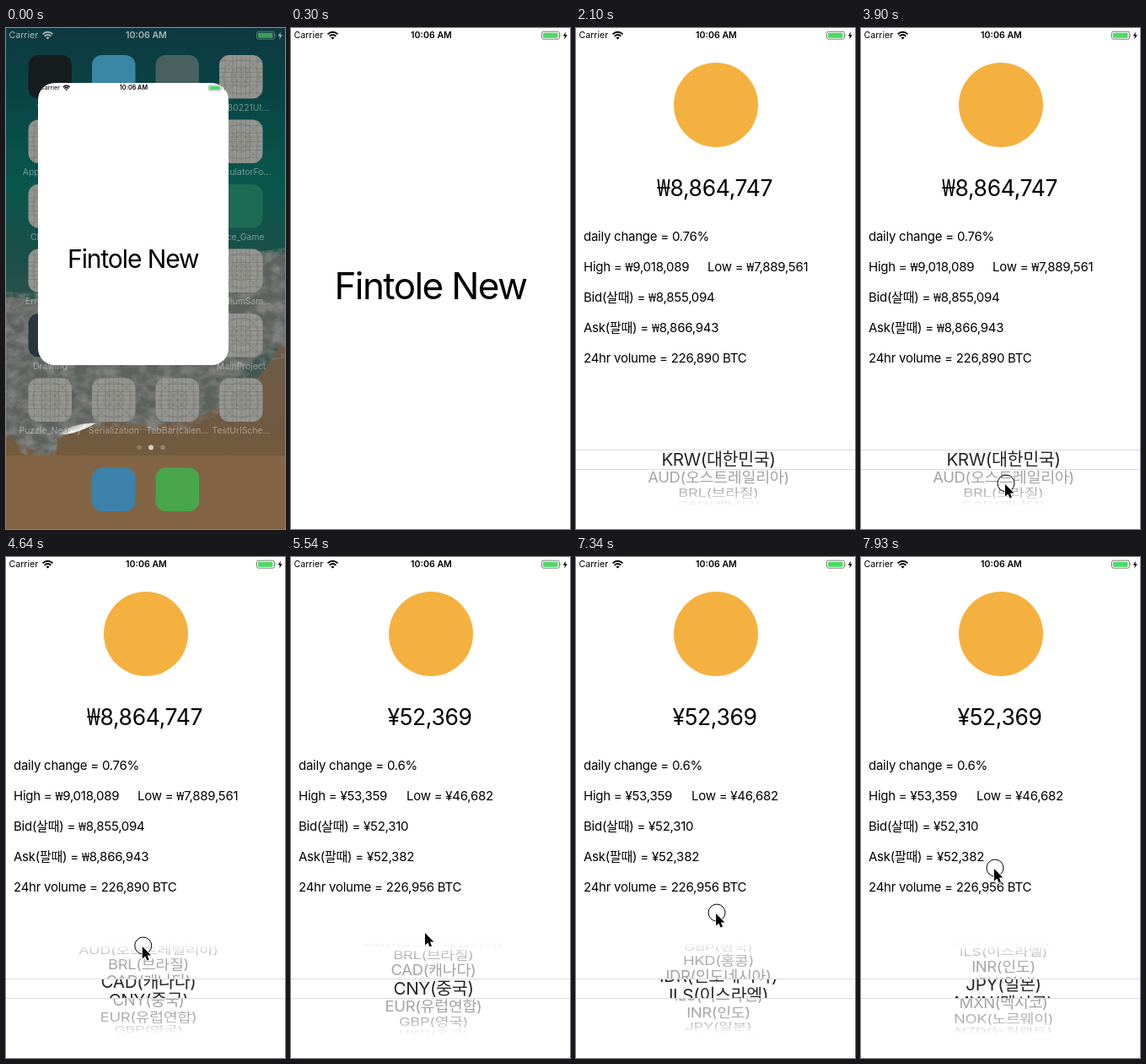
Write an HTML page that moves like this. It is 331 px wide and 593 px high and loops after 8000 ms.

```html
<!DOCTYPE html>
<html lang="ko">
<head>
<meta charset="utf-8">
<title>Price ticker</title>
<style>
  html, body { margin: 0; width: 100%; height: 100%; overflow: hidden; background: #fff; }
  body { position: relative; font-family: Inter, "Noto Sans CJK KR", "Noto Sans CJK", sans-serif; color: #000; }
  div, svg { position: absolute; }
  svg { left: 0; top: 0; overflow: visible; }
  #stage { left: 0; top: 0; width: 331px; height: 593px; overflow: hidden; background: #fff; }
  .full { left: 0; top: 0; width: 331px; height: 593px; }
  .line { white-space: pre; }
  .status { left: 0; top: 0; width: 331px; height: 18px; font-size: 10.6px; line-height: 18px; }
  .status .clock { left: 0; width: 333px; text-align: center; font-weight: 600; }
  .status .carrier { left: 3.5px; }

  #home text { font-size: 10.4px; fill: #fff; fill-opacity: .42; text-anchor: middle; }
  #card { overflow: hidden; background: #fff; }
  #zoom { transform-origin: 0 0; }
  #title { left: 0; width: 331px; top: 275px; line-height: 60px; font-size: 44px; letter-spacing: -1.6px; text-align: center; white-space: pre; }

  #coin { left: 116px; top: 41px; width: 100px; height: 100px; border-radius: 50%; background: #f5b13f; }
  #price { left: 0; width: 329px; top: 169px; line-height: 40px; font-size: 26.5px; letter-spacing: -.35px; text-align: center; }
  .fact { left: 9px; height: 30px; line-height: 30px; font-size: 15px; letter-spacing: -.25px; white-space: pre; }
  i { font: 400 1em "Noto Sans Mono", "DejaVu Sans Mono", monospace; line-height: 0; }

  #wheel, #lens { left: 0; width: 331px; overflow: hidden; }
  #wheel { top: 456px; height: 110px; color: #a3a3a3;
    --fade: linear-gradient(transparent, rgba(0,0,0,.4) 8px, rgba(0,0,0,.8) 16px, #000 30px, #000 80px, rgba(0,0,0,.8) 94px, rgba(0,0,0,.4) 102px, transparent);
    -webkit-mask: var(--fade); mask: var(--fade); }
  #lens { top: 499px; height: 22px; background: #fff; color: #262626; border: solid #dcdcdc; border-width: 1px 0; }
  .row { left: 0; width: 338px; height: 28px; line-height: 28px; font-size: 20.7px; letter-spacing: -.4px; text-align: center; white-space: pre; }
</style>
</head>
<body>
<div id="stage">
  <div id="home" class="full"></div>
  <div id="app" class="full">
    <div id="coin"></div>
    <div id="price" class="line"></div>
    <div id="facts"></div>
    <div id="wheel"></div>
    <div id="lens"></div>
  </div>
  <div id="card"><div id="zoom" class="full"><div id="title">Fintole New</div></div></div>
  <svg id="pointer" width="1" height="1">
    <circle id="ring" r="10" fill="none" stroke="#000"/>
    <path d="M-1 1V15.5L2.4 12.4 4.6 17.6 7 16.6 4.9 11.5H9.4Z" stroke="#fff" stroke-width="1.6" paint-order="stroke"/>
  </svg>
</div>
<script>
const $ = id => document.getElementById(id);
const LOOP = 8000, STEP = 150, RATE = 1.003;

// ---- status bar ----
const status = (ink, green) => `
  <div class="status" style="color:${ink}">
    <div class="carrier">Carrier</div><div class="clock">10:06 AM</div>
    <svg width="331" height="18">
      <g fill="none" stroke="${ink}" stroke-width="1.9">
        <path d="M43.5 7.4Q49.5 2 55.5 7.4M45.7 9.7Q49.5 6.3 53.3 9.7"/>
      </g>
      <path d="M47.5 11.4Q49.5 9.7 51.5 11.4L49.5 13.6Z" fill="${ink}"/>
      <rect x="297.5" y="4.2" width="21" height="9" rx="2" fill="none" stroke="${ink}" stroke-opacity=".5"/>
      <rect x="299" y="5.7" width="17.5" height="6" rx=".8" fill="${green}"/>
      <path d="M319.6 7Q321.4 8.7 319.6 10.4Z" fill="${ink}" fill-opacity=".5"/>
      <path d="M326 4.5L322.8 9.6H325L324.2 13.5 327.8 8.2H325.4Z" fill="${ink}"/>
    </svg>
  </div>`;

// ---- home screen ----
const colX = [26.5, 102, 177.5, 253];
const rowY = r => 32 + r * 76.5;
const labels = [
  ["Watch", "Files", "Folder", "20180221UI..."],
  ["AppStructure", "", "", "CalculatorFo..."],
  ["ClassTest", "", "", "Dice_Game"],
  ["ErrorHandle", "", "", "StadiumSam..."],
  ["Drawing", "", "", "MainProject"],
  ["Puzzle_Nearby", "Serialization", "TabBar(calen...", "TestUrlSche..."]
];
const solid = { "0,0": "#161c1e", "0,1": "#3a86a5", "0,2": "#48605e", "2,3": "#1d6b55", "4,0": "#273640" };
const tile = (x, y, fill) => `<rect x="${x}" y="${y}" width="51.5" height="51.5" rx="12" fill="${fill}"/>`;

function buildHome() {
  let icons = "";
  labels.forEach((names, r) => names.forEach((name, c) => {
    const x = colX[c], y = rowY(r), fill = solid[[r, c]];
    icons += fill ? tile(x, y, fill) : `<use href="#blank" x="${x}" y="${y}"/>`;
    icons += `<text x="${x + 26}" y="${y + 65.5}">${name}</text>`;
  }));
  let grid = "";
  for (const p of [7, 16, 20.5, 26, 31.5, 36, 45]) grid += `M${p} 0V52M0 ${p}H52`;
  $("home").innerHTML = `
  <svg width="331" height="593">
    <defs>
      <linearGradient id="sea" x2="0" y2="1">
        <stop offset="0" stop-color="#0d3940"/><stop offset=".16" stop-color="#094344"/>
        <stop offset=".42" stop-color="#08574d"/><stop offset=".62" stop-color="#1c4f48"/>
        <stop offset="1" stop-color="#4d5a55"/>
      </linearGradient>
      <linearGradient id="sand" x2="0" y2="1">
        <stop offset="0" stop-color="#6d5d4c"/><stop offset=".5" stop-color="#70593f"/><stop offset="1" stop-color="#82633f"/>
      </linearGradient>
      <filter id="froth" x="0" y="0" width="1" height="1" color-interpolation-filters="sRGB">
        <feTurbulence type="fractalNoise" baseFrequency=".06 .08" numOctaves="5" seed="4"/>
        <feColorMatrix values="0 0 0 0 .5  0 0 0 0 .5  0 0 0 0 .49  2.6 0 0 0 -.95"/>
        <feComposite in2="SourceGraphic" operator="in"/>
      </filter>
      <g id="blank">
        ${tile(0, 0, "#949590")}
        <g fill="none" stroke="#72706c" stroke-width=".5">
          <path d="${grid}M4 4L48 48M48 4L4 48"/>
          <circle cx="26" cy="26" r="8"/><circle cx="26" cy="26" r="12"/><circle cx="26" cy="26" r="21"/>
        </g>
      </g>
    </defs>
    <rect width="331" height="440" fill="url(#sea)"/>
    <path d="M0 470Q60 500 120 460T230 440 331 365V593H0Z" fill="url(#sand)"/>
    <path d="M0 318Q90 330 170 300T331 268V375Q290 385 265 430T150 468 60 492 0 480Z" fill="#5c625d"/>
    <path d="M0 312Q90 320 170 295T331 260V390Q290 395 265 440T150 475 60 500 0 490Z" filter="url(#froth)"/>
    <rect y="506" width="331" height="87" fill="#836545"/>
    ${icons}
    <g fill="#fff"><circle cx="158" cy="496.5" r="2.8" fill-opacity=".2"/><circle cx="172" cy="496.5" r="3" fill-opacity=".7"/><circle cx="186" cy="496.5" r="2.8" fill-opacity=".25"/></g>
    ${tile(102, 520.5, "#3d82ab")}${tile(177.5, 520.5, "#48a64b")}
  </svg>` + status("#a9b8b8", "#3f9f55");
}

// ---- app data ----
const quotes = [
  { price: "₩8,864,747", change: "0.76%", high: "₩9,018,089", low: "₩7,889,561", lowX: 156, bid: "₩8,855,094", ask: "₩8,866,943", volume: "226,890" },
  { price: "¥52,369", change: "0.6%", high: "¥53,359", low: "¥46,682", lowX: 137, bid: "¥52,310", ask: "¥52,382", volume: "226,956" }
];
const won = s => s.replace(/₩/g, "<i>₩</i>");
const fact = (row, text, x = 9) =>
  `<div class="fact" style="left:${x}px;top:${231.5 + row * 36.2}px">${won(text)}</div>`;

let shown;
function showQuote(q) {
  if (q === shown) return;
  shown = q;
  $("price").innerHTML = won(q.price);
  $("facts").innerHTML =
    fact(0, "daily change = " + q.change) +
    fact(1, "High = " + q.high) + fact(1, "Low = " + q.low, q.lowX) +
    fact(2, "Bid(살때) = " + q.bid) +
    fact(3, "Ask(팔때) = " + q.ask) +
    fact(4, `24hr volume = ${q.volume} BTC`);
}

// ---- picker ----
const currencies = ["KRW(대한민국)", "AUD(오스트레일리아)", "BRL(브라질)", "CAD(캐나다)", "CNY(중국)",
  "EUR(유럽연합)", "GBP(영국)", "HKD(홍콩)", "IDR(인도네시아)", "ILS(이스라엘)", "INR(인도)",
  "JPY(일본)", "MXN(멕시코)", "NOK(노르웨이)", "NZD(뉴질랜드)", "PLN(폴란드)"];
const TURN = 22 * Math.PI / 180, RADIUS = 57, LENS_ROW = 22.5;

function spin(pos) {
  currencies.forEach((_, i) => {
    const d = i - pos, a = d * TURN, far = Math.abs(d) > 3.6;
    const outer = $("wheel").children[i], inner = $("lens").children[i];
    outer.style.display = far ? "none" : "";
    outer.style.transform = `translateY(${41 + RADIUS * Math.sin(a)}px) ` +
      `scale(${.865 + .03 * Math.cos(a)}, ${.9 * Math.max(Math.cos(a), .05)})`;
    inner.style.display = Math.abs(d) > 1.5 ? "none" : "";
    inner.style.transform = `translateY(${-3 + d * LENS_ROW}px) scaleY(${Math.cos(a)})`;
  });
}

// ---- pointer and picker track: step, x, y, picker position ----
const track = [
  [7, 51, 513, 0], [9, 60, 536, 0],
  [18, 162, 489, 0], [19, 162, 489, 0], [23, 171, 540, 0], [25, 171, 540, 0],
  [26, 172, 539, 0], [28, 171, 508, 1], [32, 160, 444, 4.15], [33, 160, 444, 4.15],
  [35, 160, 444, 4], [37, 160, 444, 4], [40, 172, 534, 4], [42, 172, 534, 4],
  [45, 173, 471, 6.2], [49, 167, 421, 8.64], [53, 159, 368, 11.22]
];
function sample(n) {
  const k = track.findIndex(p => p[0] >= n);
  if (k <= 0) return track[0];
  const a = track[k - 1], b = track[k], u = (n - a[0]) / (b[0] - a[0]);
  return a.map((v, i) => v + (b[i] - v) * u);
}
const within = (n, a, b) => n >= a && n <= b;

// ---- launch card: left, top, width, height, corner ----
const launch = [[38, 65, 225.5, 334, 20], [7, 12, 317, 555, 20], [0, 0, 331, 593, 0]];

function draw(n) {
  const [x, y, w, h, r] = launch[Math.min(n, 2)];
  $("card").style.cssText = `left:${x}px;top:${y}px;width:${w}px;height:${h}px;border-radius:${r}px`;
  $("zoom").style.transform = `scale(${w / 331})`;
  $("card").style.visibility = n < 14 ? "visible" : "hidden";
  $("app").style.visibility = n < 14 ? "hidden" : "visible";
  $("home").style.visibility = n < 2 ? "visible" : "hidden";

  const [, px, py, pos] = sample(n);
  $("pointer").style.visibility = within(n, 7, 9) || n >= 18 ? "visible" : "hidden";
  $("pointer").style.transform = `translate(${px}px, ${py}px)`;
  $("ring").style.display = within(n, 23, 33) || n >= 40 ? "" : "none";
  showQuote(quotes[n < 37 ? 0 : 1]);
  spin(pos);
}

function tick() {
  const t = performance.now() % LOOP;
  draw(Math.min(Math.floor(t * RATE / STEP), 53));
  requestAnimationFrame(tick);
}

buildHome();
const bar = status("#000", "#4cd964");
$("zoom").insertAdjacentHTML("beforeend", bar);
$("app").insertAdjacentHTML("beforeend", bar);
$("wheel").innerHTML = $("lens").innerHTML = currencies.map(c => `<div class="row">${c}</div>`).join("");
draw(0);
requestAnimationFrame(tick);
</script>
</body>
</html>
```
